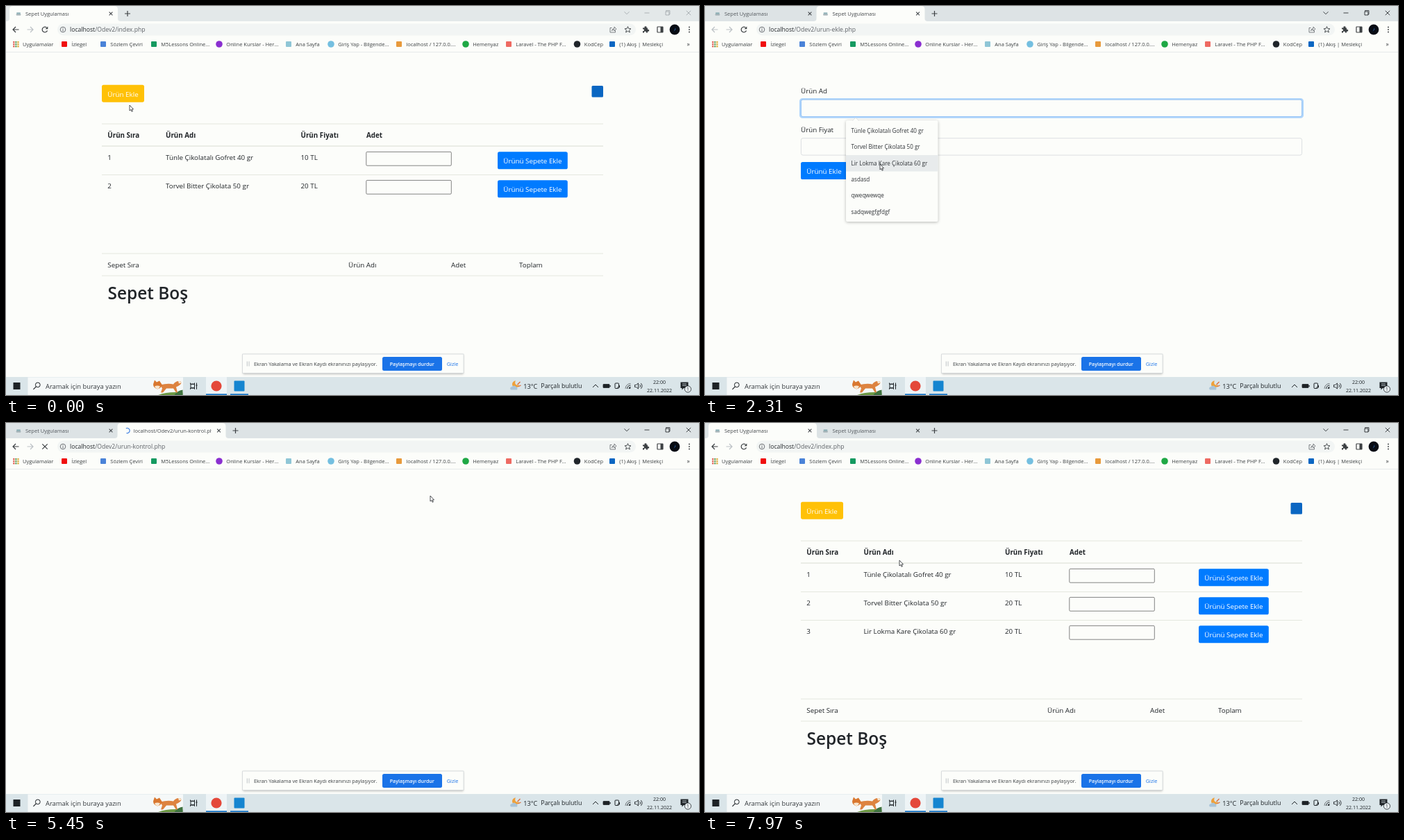
An HTML page with a canvas for the animation above (8000 ms loop, 998 px wide and 561 px high).

```html
<!DOCTYPE html>
<html lang="tr">
<head>
<meta charset="utf-8">
<title>Sepet Uygulaması</title>
<style>
html, body { margin: 0; width: 100%; height: 100%; overflow: hidden; background: #fcfdfa; }
canvas { display: block; width: 100vw; height: 100vh; }
</style>
</head>
<body>
<canvas id="stage"></canvas>
<script>
const W = 998, H = 561, LOOP = 8000;
const canvas = document.getElementById('stage');
const c = canvas.getContext('2d');
const dpr = window.devicePixelRatio || 1;
canvas.width = W * dpr;
canvas.height = H * dpr;

const PAPER = '#fcfdfa', INK = '#212529', GREY = '#5f6368', BLUE = '#007bff', LINE = '#e5e8df';
const PRODUCTS = [
  ['Tünle Çikolatalı Gofret 40 gr', '10 TL'],
  ['Torvel Bitter Çikolata 50 gr', '20 TL'],
  ['Lir Lokma Kare Çikolata 60 gr', '20 TL']
];
const NEW_NAME = PRODUCTS[2][0];
const NAME_HINTS = [...PRODUCTS.map(p => p[0]), 'asdasd', 'qweqwewqe', 'sadqwegfgfdgf'];
const PRICE_HINTS = ['20', '20 TL'];

// Moments of the session, in ms
const AT = {
  open: 860, name: 1560, pick: 2350, price: 2760, two: 2980, zero: 3150,
  send: 3980, alert: 4190, ok: 5330, back: 5480, tab: 6780, reload: 7230, fresh: 7430
};
// Pointer stops: time, x, y
const PATH = [
  [0, 178, 143], [120, 178, 143], [480, 165, 128], [900, 165, 128], [1350, 310, 152],
  [1700, 310, 152], [2150, 252, 228], [2400, 252, 228], [2680, 190, 197], [3400, 190, 197],
  [3850, 162, 241], [4550, 162, 241], [5200, 611, 105], [5450, 611, 105], [6260, 3, 0],
  [6380, 3, 0], [6680, 62, 11], [6850, 62, 11], [7120, 56, 34], [7330, 56, 34],
  [7900, 280, 198], [LOOP, 280, 198]
];

function pointer(t) {
  const i = PATH.findIndex(p => p[0] > t);
  const [t0, x0, y0] = PATH[i - 1], [t1, x1, y1] = PATH[i];
  const u = (t - t0) / (t1 - t0), k = u * u * (3 - 2 * u);
  return { x: x0 + (x1 - x0) * k, y: y0 + (y1 - y0) * k };
}
const inside = (p, x, y, w, h) => p.x >= x && p.x <= x + w && p.y >= y && p.y <= y + h;

function rect(x, y, w, h, fill, r = 0, stroke, lw = 0.8) {
  c.beginPath();
  c.roundRect(x, y, w, h, r);
  if (fill) { c.fillStyle = fill; c.fill(); }
  if (stroke) { c.strokeStyle = stroke; c.lineWidth = lw; c.stroke(); }
}
function disc(x, y, r, fill) {
  c.beginPath();
  c.arc(x, y, r, 0, 7);
  c.fillStyle = fill;
  c.fill();
}
function ring(x, y, r, color, from = 0, to = 2 * Math.PI, lw = 1) {
  c.beginPath();
  c.arc(x, y, r, from, to);
  c.strokeStyle = color;
  c.lineWidth = lw;
  c.stroke();
}
function icon(d, x, y, stroke, lw = 1, fill) {
  c.save();
  c.translate(x, y);
  const p = new Path2D(d);
  if (fill) { c.fillStyle = fill; c.fill(p); }
  if (stroke) { c.strokeStyle = stroke; c.lineWidth = lw; c.stroke(p); }
  c.restore();
}
// y is the middle of the capitals
function text(s, x, y, size = 9.8, color = INK, weight = 400, align = 'left') {
  c.font = `${weight} ${size}px "Open Sans", "Noto Sans", sans-serif`;
  c.textAlign = align;
  c.fillStyle = color;
  c.fillText(s, x, y + size * 0.357);
  return c.measureText(s).width;
}
function shadowed(draw, blur = 4, dy = 1, color = 'rgba(0,0,0,.28)') {
  c.save();
  c.shadowColor = color;
  c.shadowBlur = blur * dpr;
  c.shadowOffsetY = dy * dpr;
  draw();
  c.restore();
}
function button(label, x, y, w, h, fill) {
  rect(x, y, w, h, fill, 2.6);
  text(label, x + w / 2, y + h / 2 + 1, 9.8, '#fff', 400, 'center');
}
const hline = (y, h = 0.8) => rect(138, y - h / 2, 722, h, LINE);

const CROSS = 'M-2.4-2.4L2.4 2.4M2.4-2.4L-2.4 2.4';

function favicon(x, y) {
  rect(x - 3, y - 1.5, 6, 2, '#7fa6ad', 1);
  rect(x - 3.5, y + 0.8, 7, 1.6, '#9aa9ae', 0.8);
}
function tab(x, title, active, loading, t) {
  if (active) {
    icon('M-4 22Q0 22 0 18V5Q0 0 5 0H151Q156 0 156 5V18Q156 22 160 22Z', x, 0, null, 0, PAPER);
  }
  if (loading) ring(x + 14, 11, 3.6, '#3b7de0', t / 130, t / 130 + 3.9, 1.2);
  else favicon(x + 13, 11);
  c.save();
  c.beginPath();
  c.rect(x, 0, 135, 22);
  c.clip();
  text(title, x + 23, 11, 7.5, active ? '#45494d' : '#54595e');
  c.restore();
  icon(CROSS, x + 146, 11, '#45494d', 1.1);
}

function bookmarks() {
  for (let i = 0; i < 9; i++) {
    rect(10.2 + (i % 3) * 3.1, 51 + Math.floor(i / 3) * 3.1, 2.2, 2.2, ['#e2574c', '#5b9e58', '#e0a834'][i % 3]);
  }
  text('Uygulamalar', 24, 55.2, 7.5, '#3c4043');
  const items = [
    [84, '#f00f0f', 0, 'İzlegel'], [140, '#4a83d8', 0, 'Sözlem Çeviri'],
    [213, '#159a61', 0, 'M5Lessons Online...'], [307, '#8a2fd0', 1, 'Online Kurslar - Her...'],
    [407, '#8fc6d6', 0, 'Ana Sayfa'], [468, '#74bfe0', 1, 'Giriş Yap - Bilgende...'],
    [566, '#e89a3c', 0, 'localhost / 127.0.0....'], [662, '#1fa845', 1, 'Hemenyaz'],
    [724, '#ee6a62', 0, 'Laravel - The PHP F...'], [822.5, '#20252a', 1, 'KodCep'],
    [873, '#0a66c2', 0, '(1) Akış | Meslekçi']
  ];
  for (const [x, color, round, label] of items) {
    if (round) disc(x, 55, 4.8, color);
    else rect(x - 4, 51, 8, 8, color, 1);
    text(label, x + 10.3, 55.2, 7.5, '#3c4043');
  }
  text('»', 980.5, 54.5, 8.5, '#3c4043');
}

function browser(s, t) {
  const two = t >= AT.open, dark = '#3c4043', pale = '#bcc1c5';
  rect(0, 0, W, 22, two ? '#dde3e5' : '#e3e8e9');
  tab(5, 'Sepet Uygulaması', !s.second, s.reloading, t);
  if (two) tab(160.5, s.checking ? 'localhost/Odev2/urun-kontrol.php' : 'Sepet Uygulaması', s.second, s.checking, t);
  icon('M-4 0H4M0-4V4', two ? 330.5 : 175, 11, dark, 1.2);

  const win = two ? '#2b2f33' : '#a5abaf';
  icon('M-3.5-1.7L0 1.8L3.5-1.7', 894, 10, win, 0.9);
  icon('M-3.5 0H3.5', 923, 10, win, 0.9);
  rect(950, 8, 5, 5, null, 0, win, 0.9);
  icon('M-1.5-2V-3.5H4V2H2.5', 952, 10, win, 0.8);
  icon('M-3.2-3.2L3.2 3.2M3.2-3.2L-3.2 3.2', 983, 10, win, 0.9);

  const arrow = 'M4.5 0H-4M0-4L-4 0L0 4';
  icon(arrow, 14, 34, s.page === 'form' && t < AT.send ? pale : dark, 1.2);
  c.save();
  c.translate(35, 34);
  c.scale(-1, 1);
  icon(arrow, 0, 0, pale, 1.2);
  c.restore();
  if (s.checking || s.reloading) icon('M-3.7-3.7L3.7 3.7M3.7-3.7L-3.7 3.7', 56, 34, dark, 1.2);
  else {
    ring(56, 34, 3.8, dark, 0.4, 5.4, 1.2);
    icon('M4.3-4.5V-.8H.6Z', 56, 34, null, 0, dark);
  }

  rect(74, 25.5, 833, 17, '#f2f5f4', 8.5);
  ring(82, 34, 3.8, GREY, 0, 7, 0.9);
  rect(81.5, 33.4, 1, 2.8, GREY);
  rect(81.5, 31.7, 1, 1, GREY);
  const host = text('localhost', 92, 34, 8.65, '#25292d');
  text('/Odev2/' + s.file, 92 + host, 34, 8.65, GREY);

  icon('M-1.5-2.5H-4V4H3.5V1.5M-1.5 1.5Q-1-1.5 2-1.5V-4L5-.8L2 2V0Q0 0-1.5 1.5', 874, 34, GREY, 0.8);
  icon('M0-4.4L1.3-1.4L4.5-1.2L2 .9L2.9 4L0 2.3L-2.9 4L-2 .9L-4.5-1.2L-1.3-1.4Z', 895.5, 34, dark, 0.9);
  icon('M-4-2.6H-1.4A1.5 1.5 0 1 1 1.4-2.6H3V0A1.5 1.5 0 1 1 3 2.6V4.5H.8A1.4 1.4 0 1 0-1.8 4.5H-4V2A1.4 1.4 0 1 0-4-.5Z', 921, 34, null, 0, dark);
  rect(938, 30, 8, 8, null, 0.5, dark, 1.2);
  rect(942.5, 30, 3.5, 8, dark);
  disc(963, 34, 7.4, '#070b14');
  icon('M-1.5 3L1-3L1.5 0Z', 963, 34, null, 0, '#244a78');
  for (const y of [30.5, 34, 37.5]) disc(984, y, 0.95, dark);
  bookmarks();
  rect(0, 66.2, W, 0.8, '#e1e5e4');
}

function listPage(s, p) {
  const rows = s.fresh ? 3 : 2;
  const [name, price, qty, add] = s.fresh ? [228.5, 432, 525, 711] : [230, 424.5, 519, 708];
  const low = s.fresh ? 41 : 0;
  const hot = inside(p, 138, 114, 61, 25);
  button('Ürün Ekle', 138, 113.7, 61, 25, hot ? '#dca500' : '#ffc107');
  rect(843.5, 115, 16.5, 16.5, '#0a66c2', 1.5);
  hline(170);
  text('Ürün Sıra', 146.3, 187, 9.8, INK, 700);
  text('Ürün Adı', name, 187, 9.8, INK, 700);
  text('Ürün Fiyatı', price, 187, 9.8, INK, 700);
  text('Adet', qty, 187, 9.8, INK, 700);
  hline(202, 1.3);
  for (let i = 0; i < rows; i++) {
    const y = 219 + i * 41;
    if (i) hline(y - 16.5);
    text(String(i + 1), 146.3, y, 9.8);
    text(PRODUCTS[i][0], name, y);
    text(PRODUCTS[i][1], price, y);
    rect(qty - 0.2, y - 8.6, 122.5, 19.8, PAPER, 1.3, '#767676', 0.9);
    button('Ürünü Sepete Ekle', add, y - 8.7, 100.8, 25, BLUE);
  }
  hline(357 + low);
  [['Sepet Sıra', 146.3], ['Ürün Adı', 493], ['Adet', 641], ['Toplam', 739]]
    .forEach(([label, x]) => text(label, x, 374 + low));
  hline(389 + low);
  text('Sepet Boş', 146.5, 414 + low, 24.4, INK, 600);
  if (hot && !s.second) {
    rect(-3, 520, 119, 15.5, '#dfe4e6', 3, '#cbd1d3', 0.6);
    text('localhost/Odev2/urun-ekle.php', 3, 528, 7.3, GREY);
  }
}

function field(y, h, value, focusAt, t, keyAt) {
  const focused = focusAt != null;
  const k = focused ? Math.min(1, (t - focusAt) / 150) : 0;
  if (focused) rect(137.2, y - 0.8, 723.6, h + 1.6, null, 3, `rgba(0,123,255,${0.3 * k})`, 2.6 * k);
  rect(138.4, y, 721.2, h, PAPER, 2.6, '#d3d8db', 0.8);
  if (focused) rect(138.4, y, 721.2, h, null, 2.6, `rgba(128,189,255,${k})`, 0.8);
  const w = text(value, 147, y + h / 2 + 0.6, 9.8, '#495057');
  if (focused && (t - keyAt) % 1060 < 530) rect(147 + w, y + 5.5, 0.8, h - 11.5, '#333');
}
function hints(list, x, y, w, h, p) {
  shadowed(() => rect(x, y, w, h, PAPER, 2));
  icon('M-4.5.4L0-4L4.5.4', x + 14, y, '#d7dadb', 0.7, PAPER);
  list.forEach((label, i) => {
    const mid = y + 15 + i * 23.4;
    if (inside(p, x, mid - 11.7, w, 23.4)) rect(x, mid - 11.7, w, 23.4, '#e8ebec');
    text(label, x + 7.6, mid, 8.1, '#2f3337');
  });
}
function formPage(t, p) {
  const blank = t >= AT.back;
  const onName = !blank && t >= AT.name && t < AT.price;
  const onPrice = !blank && t >= AT.price && t < AT.send;
  const price = blank || t < AT.two ? '' : t < AT.zero ? '2' : '20';
  const keyAt = t >= AT.zero ? AT.zero : t >= AT.two ? AT.two : AT.price;
  text('Ürün Ad', 138, 122.3);
  field(135, 24.6, !blank && t >= AT.pick ? NEW_NAME : '', onName ? AT.name : null, t, t < AT.pick ? AT.name : AT.pick);
  text('Ürün Fiyat', 138, 178.5);
  field(190.7, 24.4, price, onPrice ? AT.price : null, t, keyAt);
  if (onPrice || inside(p, 138, 191, 722, 24)) {
    rect(841.5, 196.5, 9.5, 12, '#eff0f0');
    icon('M-2.4-1.4L0-4L2.4-1.4ZM-2.4 1.4L0 4L2.4 1.4Z', 846.2, 202.5, null, 0, '#45494d');
  }
  const hot = !blank && inside(p, 138, 225, 67, 25);
  button('Ürünü Ekle', 138, 225, 67, 25, hot ? '#0069d9' : BLUE);
  if (onName && t >= AT.name + 40 && t < AT.pick) hints(NAME_HINTS, 203, 165, 132.5, 146, p);
  if (onPrice && t >= AT.price + 60 && t < AT.send - 150) hints(PRICE_HINTS, 203, 221, 46.5, 52.5, p);
}

function alertBox() {
  shadowed(() => rect(352.5, 41, 292.5, 85, PAPER, 3), 5, 1);
  text('localhost web sitesinin mesajı', 364, 60, 9.15, '#33373b');
  text('Başarılı: ' + NEW_NAME + ' Kayıt Edildi!', 364, 78.3, 8.05, '#33373b');
  rect(587, 94.2, 47.5, 21.4, '#fff', 3, '#2a73d6', 1.4);
  rect(588.8, 96, 43.9, 17.8, '#2f7de6', 2);
  text('Tamam', 610.6, 105, 7.5, '#fff', 600, 'center');
}

function shareBar() {
  shadowed(() => rect(340.5, 502, 318.5, 27.5, PAPER), 3, 1, 'rgba(0,0,0,.25)');
  rect(340.5, 502, 318.5, 27.5, null, 0, '#cdd2d5', 0.7);
  for (const x of [346.8, 349.6]) rect(x, 512.5, 0.9, 7, '#b9bec2');
  text('Ekran Yakalama ve Ekran Kaydı ekranınızı paylaşıyor.', 357, 516, 7.3, '#3c4043');
  rect(542, 506, 86, 20, '#1a73e8', 2.5);
  text('Paylaşmayı durdur', 584.8, 516, 7.1, '#fff', 600, 'center');
  text('Gizle', 634.8, 516, 7.3, '#1a73e8');
}

function fox() {
  c.save();
  c.beginPath();
  c.rect(210, 535.5, 44.5, 25.5);
  c.clip();
  const part = (d, fill) => icon(d, 210, 535.5, null, 0, fill);
  part('M8 26Q22 20 45 22V26Z', '#6d9a44');
  part('M32 26Q37 19 45 18V26Z', '#3f7340');
  part('M12 11Q23 8 31 10Q35 4 42 6Q44 10 35 14L37 22H35L31 16H21L16 22H13L15 16Z', '#dd8340');
  part('M2 10L4 4L7 7L11 5L15 11Q13 16 8 17Q2 15 2 10Z', '#d9772f');
  part('M4 13Q8 11 12 13Q10 17 8 17Q5 16 4 13Z', '#f7e6cf');
  part('M38 5.5Q43 5 42.5 8L39 9Z', '#f7e6cf');
  c.restore();
}
function taskbar() {
  const ink = '#1d2226';
  rect(0, 535, W, 26, '#dae5e9');
  rect(10.5, 543, 10, 10, ink);
  rect(31.5, 535.5, 223.5, 25.5, '#f5f8f8');
  ring(45.8, 546.4, 3.4, ink, 0, 7, 1);
  icon('M0 0L-4 4', 43.4, 548.8, ink, 1.1);
  text('Aramak için buraya yazın', 57, 548.3, 9.4, '#33383c');
  fox();
  rect(266, 545.3, 5.5, 5.5, null, 0, ink, 1);
  icon('M-4.5-4.5V-2.7H1.5V-4.5M-4.5 4.8V3H1.5V4.8M4.5-4.5V4.8M3.4-1H5.6', 270, 548, ink, 1);
  rect(288, 535, 30, 26, '#eef4f6');
  disc(303, 548, 7.6, '#e4483a');
  rect(328.5, 540.5, 15, 15, '#1585d0', 1);
  rect(288, 559.3, 30, 1.7, '#1877c9');
  rect(323, 559.3, 26, 1.7, '#1877c9');

  disc(734, 545.5, 5, '#eea03a');
  disc(737, 543, 3.8, '#dae5e9');
  icon('M-5.5 4.5Q-8 1-4 0Q-1-3 2 0Q5 1 3.5 4.5Z', 732.5, 549, null, 0, '#a9c3d8');
  icon('M-2 2L2-2M-1 5L3 3', 738.5, 544, '#dc6a3a', 1.3);
  text('13°C', 745.3, 548.3, 9.1, ink);
  text('Parçalı bulutlu', 770.3, 548.3, 8.9, ink);
  icon('M-4 2L0-2L4 2', 849, 548, ink, 1);
  rect(860, 545.5, 9, 5, ink, 0.5, ink, 0.8);
  rect(869.5, 547, 1.2, 2.2, ink);
  rect(877, 544, 5.5, 7.5, null, 1, ink, 1);
  icon('M-1 1.5H2.5M2.5-1.5V1.5', 881, 548.5, ink, 0.9);
  for (const r of [2.5, 5, 7.5]) ring(899.5, 552, r, r > 5 ? '#6d7478' : ink, Math.PI, 1.5 * Math.PI, 1);
  disc(898.5, 551, 1, ink);
  icon('M-5-1.5H-3L0-4V4L-3 1.5H-5Z', 910.5, 548, ink, 0.9);
  ring(910.5, 548, 3, ink, -0.8, 0.8, 0.9);
  ring(910.5, 548, 5.5, ink, -0.8, 0.8, 0.9);
  text('22:00', 941, 542.2, 7.1, ink, 400, 'center');
  text('22.11.2022', 941, 554.2, 7.1, ink, 400, 'center');
  icon('M-5.5-5H5.5V3.5H-1L-3.5 6V3.5H-5.5Z', 977, 547.5, null, 0, ink);
  icon('M-3-2.5H3M-3-.2H3', 977, 547.5, '#dae5e9', 0.8);
  disc(982, 552.5, 4.6, '#e9eff2');
  ring(982, 552.5, 4.6, ink, 0, 7, 0.8);
  text('1', 982, 552.6, 6.6, ink, 400, 'center');
}

function cursorKind(s, p) {
  if (s.page === 'list') return inside(p, 138, 114, 61, 25) ? 'hand' : 'arrow';
  if (s.page === 'form') {
    if (inside(p, 138, 135, 722, 25) || inside(p, 138, 191, 722, 24)) return 'beam';
  }
  return 'arrow';
}
function cursor(kind, { x, y }) {
  if (kind === 'beam') icon('M-2-4.2Q0-4.2 0-3.2Q0-4.2 2-4.2M0-3.2V3.4M-2 4.4Q0 4.4 0 3.4Q0 4.4 2 4.4', x, y, '#24282b', 0.9);
  else if (kind === 'hand') icon('M-1 .8Q0-.6 1 .8V4L4 4.6Q5.2 5 5 6.5L4.2 9.8H-.6L-3.4 6.2Q-3.2 4.6-1 6.2Z', x, y, '#24282b', 0.8, '#fff');
  else icon('M0 0V8L1.8 6.4L3.1 9.3L4.4 8.7L3.1 5.9H5.5Z', x, y, '#24282b', 0.8, '#fff');
}

function stateAt(t) {
  const second = t >= AT.open && t < AT.tab;
  const checking = t >= AT.send + 60 && t < AT.back;
  const page = !second ? 'list' : checking ? 'blank' : 'form';
  return {
    second, checking, page,
    fresh: t >= AT.fresh,
    reloading: t >= AT.reload && t < AT.fresh,
    file: !second ? 'index.php' : checking ? 'urun-kontrol.php' : 'urun-ekle.php'
  };
}

function draw(t) {
  const s = stateAt(t), p = pointer(t);
  c.setTransform(dpr, 0, 0, dpr, 0, 0);
  rect(0, 0, W, H, PAPER);
  if (s.page === 'list') listPage(s, p);
  if (s.page === 'form') formPage(t, p);
  browser(s, t);
  if (t >= AT.alert && t < AT.ok) alertBox();
  shareBar();
  taskbar();
  cursor(cursorKind(s, p), p);
}

const start = performance.now();
function tick() {
  draw((performance.now() - start) % LOOP);
  requestAnimationFrame(tick);
}
tick();
</script>
</body>
</html>
```
